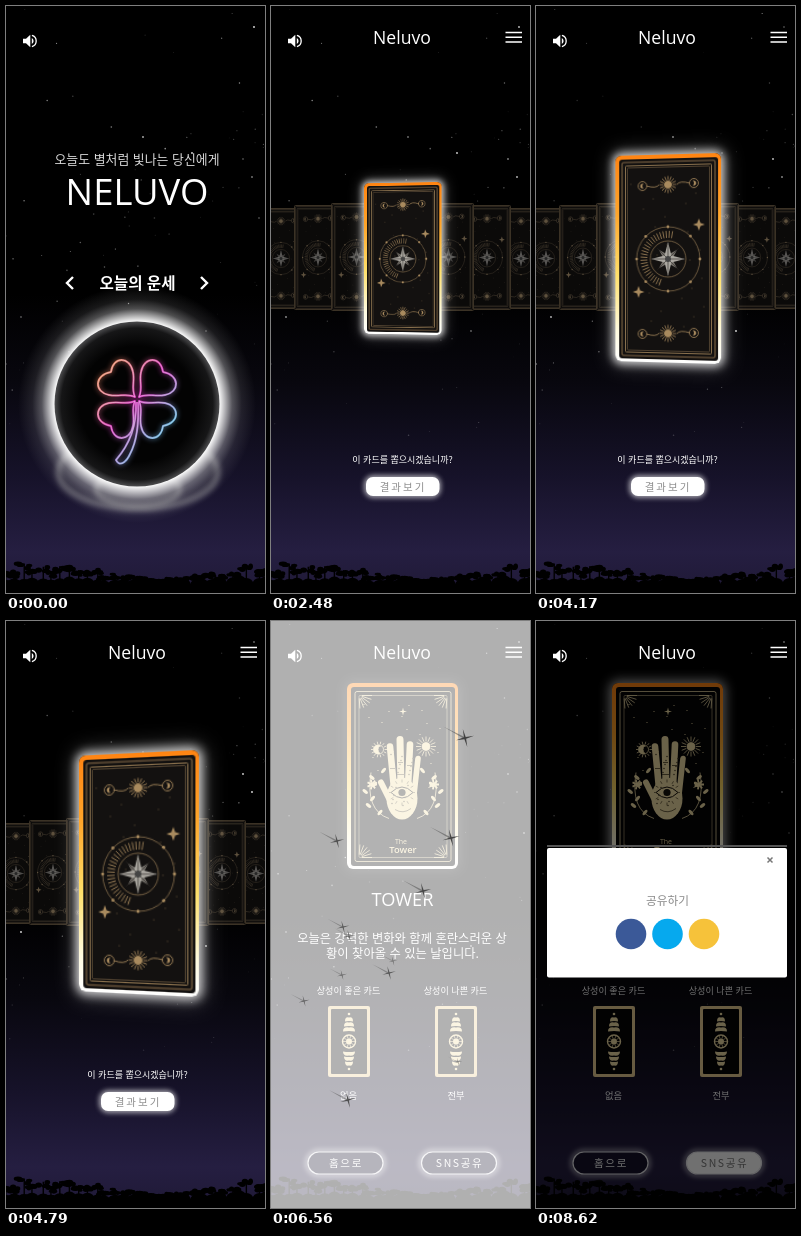
Animation of 259x587 px, one loop 8670 ms. Source, as an HTML page:

```html
<!DOCTYPE html>
<html lang="ko">
<head>
<meta charset="utf-8">
<title>Neluvo</title>
<style>
html, body { margin: 0; width: 100%; height: 100%; overflow: hidden; background: #000; }
#stage { position: relative; width: 259px; height: 587px; overflow: hidden; background: #000; }
#stage > svg { position: absolute; left: 0; top: 0; width: 259px; height: 587px; }
text { font-family: "Noto Sans CJK KR", "Noto Sans CJK", "Noto Sans", sans-serif; text-anchor: middle; fill: #fff; }
.latin { font-family: "Open Sans", "Noto Sans", sans-serif; }
.frame {
  position: absolute; box-sizing: border-box; padding: 3.5px; border-radius: 6px;
  background: linear-gradient(#ff8412, #ffa52a 28%, #ffe06a 58%, #fffbe0 85%, #fff);
}
.frame svg { display: block; width: 100%; height: 100%; }
#card {
  left: 78px; top: 149px; width: 107px; height: 207px;
  box-shadow: 0 0 9px 3px rgba(255,255,255,.75), 0 0 18px 5px rgba(255,255,255,.25);
}
#prize { left: 76px; top: 62px; width: 111px; height: 186px; }
#near { clip-path: inset(0 0 0 169px); }
#white { position: absolute; inset: 0; background: #fff; }
#dim { position: absolute; inset: 0; background: #000; }
</style>
</head>
<body>
<div id="stage"></div>
<script>
const LOOP = 8670;
const GOLD = '#a88a5e', CREAM = '#f3dfa6';

let seed = 11;
const rnd = () => (seed = (seed * 16807) % 2147483647) / 2147483647;
const clamp = v => Math.max(0, Math.min(1, v));
const ramp = (t, a, b) => clamp((t - a) / (b - a));
const times = (n, fn) => Array.from({ length: n }, (_, i) => fn(i)).join('');

// Value at time t in a table of [time, value] steps
function track(t, keys) {
  for (let i = 1; i < keys.length; i++) {
    const [a, u] = keys[i - 1], [b, v] = keys[i];
    if (t < b) return u + (v - u) * ramp(t, a, b);
  }
  return keys[keys.length - 1][1];
}

const svg = (id, body) => `<svg id="${id}" viewBox="0 0 259 587">${body}</svg>`;
const label = (x, y, size, str, more = '') => `<text x="${x}" y="${y}" font-size="${size}" ${more}>${str}</text>`;
const circle = (x, y, r, more = '') => `<circle cx="${x}" cy="${y}" r="${r}" ${more}/>`;
const ellipse = (x, y, rx, ry, more = '') => `<ellipse cx="${x}" cy="${y}" rx="${rx}" ry="${ry}" ${more}/>`;
const rect = (x, y, w, h, r, more = '') => `<rect x="${x}" y="${y}" width="${w}" height="${h}" rx="${r}" ${more}/>`;
const path = (d, more = '') => `<path d="${d}" ${more}/>`;
const at = (x, y, body, more = '') => `<g transform="translate(${x} ${y}) ${more}">${body}</g>`;

const rays = (n, r1, r2, from = 0, span = 2 * Math.PI) => times(n, i => {
  const a = from + span * i / n, c = Math.cos(a), s = Math.sin(a);
  return `M${(c * r1).toFixed(2)} ${(s * r1).toFixed(2)}L${(c * r2).toFixed(2)} ${(s * r2).toFixed(2)}`;
});
const spark = (r, w) => `M0 ${-r}L${w} ${-w}L${r} 0L${w} ${w}L0 ${r}L${-w} ${w}L${-r} 0L${-w} ${-w}Z`;

// ---- sky ----
const stars = [[248, 21], [237, 153], [246, 171], [186, 147], [137, 131], [15, 311], [200, 325], [253, 212]]
  .map(([x, y]) => ({ x, y, r: .9, a: .9, p: rnd() * 6 }));
for (let i = 0; i < 80; i++) {
  const x = rnd() * 259, y = i < 36 ? 285 - x * .9 + rnd() * 110 : rnd() * 450;
  stars.push({ x, y, r: .35 + rnd() * .5, a: .2 + rnd() * .5, p: rnd() * 6 });
}

// Crowns stand high at both sides and low in the middle
const trees = times(30, i => {
  const x = i * 9 + rnd() * 5 - 3, side = Math.min(1, Math.abs(x - 150) / 75);
  const top = 574 - side * (4 + 13 * rnd()), w = 5 + rnd() * 4;
  return path(`M${x} 587V${top}`, 'stroke="#000" stroke-width="1.4"') +
    times(6, () => ellipse(x + (rnd() - .5) * w * 1.5, top + rnd() * 5, 2 + rnd() * 2.4, 1.4 + rnd() * 1.4)) +
    ellipse(x, 580 - side * 2, 7, 4 + rnd() * 4);
});

const sky = svg('sky', `
  <defs>
    <linearGradient id="night" x2="0" y2="1">
      <stop offset=".49" stop-color="#000"/><stop offset=".64" stop-color="#08070e"/>
      <stop offset=".8" stop-color="#161229"/><stop offset=".93" stop-color="#251e41"/>
      <stop offset="1" stop-color="#1f1936"/>
    </linearGradient>
    <radialGradient id="halo">
      <stop offset=".69" stop-color="#fff"/><stop offset=".735" stop-color="#fff" stop-opacity=".72"/>
      <stop offset=".8" stop-color="#fff" stop-opacity=".3"/><stop offset=".88" stop-color="#fff" stop-opacity=".09"/>
      <stop offset="1" stop-color="#fff" stop-opacity="0"/>
    </radialGradient>
    <radialGradient id="orb">
      <stop offset=".7" stop-color="#030303"/><stop offset=".92" stop-color="#161617"/><stop offset="1" stop-color="#4c4c4e"/>
    </radialGradient>
    <linearGradient id="neon" gradientUnits="userSpaceOnUse" x1="-40" y1="-34" x2="38" y2="34">
      <stop offset="0" stop-color="#e08a4a"/><stop offset=".3" stop-color="#d9688a"/>
      <stop offset=".5" stop-color="#d02fb4"/><stop offset=".68" stop-color="#a86fc4"/><stop offset="1" stop-color="#48c4dc"/>
    </linearGradient>
    <filter id="soft" x="-50%" y="-80%" width="200%" height="260%"><feGaussianBlur stdDeviation="2.6"/></filter>
    <symbol id="back" viewBox="-50 -100 100 200" preserveAspectRatio="none">${cardBack()}</symbol>
  </defs>
  <rect width="259" height="587" fill="url(#night)"/>
  <g id="stars" fill="#fff">${stars.map(s => circle(s.x, s.y, s.r)).join('')}</g>
  ${trees}<rect y="578" width="259" height="9"/>`);

// ---- tarot back ----
function cardBack() {
  const sun = y => at(0, y,
    path('M-22 1Q-12 4 -9 0M22 -1Q12 -4 9 0') + path(rays(16, 4.5, 8.5)) + circle(0, 0, 3.6, `fill="${GOLD}"`) +
    circle(-26, 1, 4.5) + circle(26, -1, 4.5) +
    path('M-25 -1.5a2.6 2.6 0 1 0 0 5a3.4 3.4 0 0 1 0 -5M25 -3.5a2.6 2.6 0 1 1 0 5a3.4 3.4 0 0 0 0 -5', `fill="${GOLD}" stroke="none"`));
  const dots = times(26, i => circle(((i * 37) % 76) - 38, ((i * 61) % 150) - 75, .45));
  return rect(-50, -100, 100, 200, 3, 'fill="#131110"') +
    `<g fill="none" stroke="${GOLD}" stroke-width=".8">` +
    rect(-47, -97, 94, 194, 2, 'stroke="#5e4b34" stroke-width="1.6"') + rect(-43.5, -93.5, 87, 187, 1) +
    rect(-41.5, -91.5, 83, 183, 1, 'stroke-width=".4"') + sun(-74) + sun(74) +
    circle(0, 0, 32, 'stroke-width=".6"') + circle(0, 0, 18, 'stroke-width=".6"') +
    path(rays(26, 21, 28, 1.9, 3.1)) + '</g>' +
    `<g fill="${GOLD}">${dots}` + times(8, i => circle(32 * Math.cos(i * .785), 32 * Math.sin(i * .785), 1.4)) +
    at(31, -34, path(spark(6, 1.6))) + at(-30, 33, path(spark(6, 1.6))) + '</g>' +
    path(spark(13, 3), 'fill="#77736d" transform="rotate(45)"') + path(spark(17, 3.4), 'fill="#aaa7a0"') +
    path(rays(8, 0, 15), 'stroke="#2a2724" stroke-width=".6"') + circle(0, 0, 3, 'fill="#444"');
}

// ---- home ----
const petal = 'M-2 -2C-6 -10 -2 -18 -4 -27C-7 -43 -24 -43 -26 -27C-43 -24 -43 -7 -28 -4C-18 -2 -10 -6 -2 -2Z';
const mirror = (d, sx, sy) => d.replace(/(-?\d+) (-?\d+)/g, (_, x, y) => `${x * sx} ${y * sy}`);
const clover = mirror(petal, 1, 1) + mirror(petal, -1, 1) + mirror(petal, 1, -1) + mirror(petal, -1, -1) +
  'M-1 3C0 28 -8 46 -21 61C-17 69 -10 62 -7 55C0 42 2 24 1 3';
const ripple = (y, rx, ry, w) => ellipse(132, y, rx, ry, `fill="#555" fill-opacity=".22" stroke="#aaa" stroke-opacity=".4" stroke-width="${w}" filter="url(#soft)"`);
const home = svg('home',
  ripple(466, 80, 37, 6) + ripple(483, 42, 18, 5) +
  circle(131, 398, 119, 'fill="url(#halo)"') + circle(131, 398, 82.5, 'fill="url(#orb)"') +
  at(131, 393, `<g fill="none" stroke="url(#neon)" stroke-linejoin="round">` +
    path(clover, 'stroke-width="3.4" opacity=".5" filter="url(#soft)"') + path(clover, 'stroke-width="2"') +
    path(clover, 'stroke="#fff" stroke-width=".6" opacity=".7"') + '</g>') +
  label(131, 158, 12.9, '오늘도 별처럼 빛나는 당신에게', 'font-weight="300" opacity=".85"') +
  label(131, 199, 36.5, 'NELUVO', 'class="latin"') +
  label(131.5, 283, 15.6, '오늘의 운세', 'font-weight="700"') +
  path('M67 271l-6 6l6 6M195 271l6 6l-6 6', 'fill="none" stroke="#fff" stroke-width="2.4"'));

// ---- deck ----
const slot = (x, y, w, h) => `<use href="#back" x="${x}" y="${y}" width="${w}" height="${h}"/>` +
  rect(x + .5, y + .5, w - 1, h - 1, 1, 'fill="none" stroke="#6b5638" stroke-width="1"');
const shade = body => `<g style="filter:brightness(.58) saturate(.75)">${body}</g>`;
const deck = svg('deck', shade(
  slot(-14, 202, 48, 101) + slot(23, 199, 48, 105) + slot(60, 197, 51, 108) +
  slot(226, 202, 48, 101) + slot(192, 199, 48, 105) + slot(152, 197, 51, 108)));
const near = svg('near', shade(slot(152, 197, 51, 110)));
const ask = svg('ask', label(131.5, 457, 9, '이 카드를 뽑으시겠습니까?') +
  '<g id="see">' + rect(93, 469, 77, 23, 9, 'fill="#fff" opacity=".6" filter="url(#soft)"') +
  rect(95, 471, 73.5, 19, 7, 'fill="#fff"') +
  label(132, 484.5, 10.5, '결과보기', 'style="fill:#8d8d8d" letter-spacing="2" font-weight="300"') + '</g>');

// ---- result ----
function handCard() {
  const finger = (x1, y1, x2, y2, w) => path(`M${x1} ${y1}L${x2} ${y2}`, `stroke="${CREAM}" stroke-width="${w}" stroke-linecap="round"`);
  const corner = (sx, sy) => at(sx * 44, sy * 81, path(rays(6, 3, 13, 0, 1.8)), `scale(${-sx} ${-sy})`);
  const sprig = s => path(`M${s * 14} 42Q${s * 38} 34 ${s * 32} -4`) +
    times(7, i => at(s * (26 + 8 * Math.sin(i * .6) + (i % 2 ? 4 : -3)), 36 - i * 7, ellipse(0, 0, 3.2, 1.6, `fill="${CREAM}" stroke="none" transform="rotate(${s * (i % 2 ? -40 : 50)})"`))) +
    at(s * 31, 8, circle(0, 0, 2, `fill="${CREAM}"`) + path(rays(7, 2, 5), 'stroke-width="1.8"'));
  const dots = times(24, i => circle(((i * 29) % 78) - 39, ((i * 47) % 88) - 72, .6, `fill="${CREAM}" stroke="none"`));
  const ink = times(22, i => circle(((i * 17) % 23) - 12, ((i * 31) % 60) - 22, .7, 'fill="#3a321f"'));
  return `<svg viewBox="-52 -89.5 104 179"><rect x="-52" y="-89.5" width="104" height="179" rx="3" fill="#050505"/>` +
    `<g fill="none" stroke="${CREAM}" stroke-width=".8">` + rect(-48, -85, 96, 170, 2) + rect(-44, -81, 88, 162, 1, 'stroke-width=".5"') +
    corner(1, 1) + corner(-1, 1) + corner(1, -1) + corner(-1, -1) + sprig(1) + sprig(-1) + dots +
    at(23, -30, circle(0, 0, 4, `fill="${CREAM}"`) + path(rays(16, 5, 10))) +
    at(-24, -27, circle(0, 0, 4.5) + path('M1 -4a4.5 4.5 0 1 0 0 8a5 5 0 0 1 0 -8', `fill="${CREAM}"`) + path(rays(14, 5.5, 8))) +
    at(0, -65, path(spark(4, .8), `fill="${CREAM}" stroke="none"`)) + '</g>' +
    finger(-13, -30, -9, 12, 6.6) + finger(-3, -37, -2, 10, 7) + finger(7, -32, 5, 10, 6.6) + finger(15, -18, 11, 18, 5.6) +
    finger(-22, 6, -11, 28, 6) + ellipse(-1, 22, 15.5, 21, `fill="${CREAM}"`) + ink +
    path('M-12 16Q-1 5 10 16Q-1 27 -12 16Z', `fill="${CREAM}" stroke="#15120c" stroke-width="1"`) +
    circle(-1, 16, 3.6, 'fill="#15120c"') + path(rays(12, 10, 13), 'transform="translate(-1 16)" stroke="#4a3f28" stroke-width=".7"') +
    path('M-8 33Q0 38 8 32M-6 -2h8M-13 -8h5M-5 -14h5M4 -11h5', 'fill="none" stroke="#4a3f28" stroke-width=".8"') +
    label(-2, 67, 7, 'The', `class="latin" style="fill:${CREAM}"`) +
    label(0, 76, 9.4, 'Tower', `class="latin" style="fill:${CREAM}" font-weight="600"`) + '</svg>';
}
const leaf = (y, w) => path(`M0 ${y}Q${-w} ${y + 1} ${-w} ${y - 4}Q0 ${y - 3} ${w} ${y - 4}Q${w} ${y + 1} 0 ${y}Z`);
const smallCard = x => rect(x, 385, 42, 71, 2, 'fill="#ecd094"') + rect(x + 3, 388, 36, 65, 1, 'fill="#050505"') +
  at(x + 21, 420.5, `<g fill="${CREAM}">` +
    circle(0, 0, 6.5, `fill="none" stroke="${CREAM}" stroke-width="1.4"`) + circle(0, 0, 3) +
    path(rays(10, 3, 6), `stroke="${CREAM}" stroke-width=".7"`) +
    [1, -1].map(s => at(0, 0, times(3, i => leaf(14 + i * 5, 6 - i)) + circle(0, 27.5, 1.3), `scale(1 ${s})`)).join('') + '</g>');
const pill = (x, str, id) => rect(x - 1, 530, 77, 24, 12, 'fill="none" stroke="#fff" stroke-width="3" opacity=".65" filter="url(#soft)"') +
  rect(x, 531, 75, 22, 11, `id="${id}" fill="#15112a" stroke="#e4e4e8" stroke-width="1.2"`) +
  label(x + 38, 546, 10.5, str, `id="${id}Text" letter-spacing="1.6" font-weight="300"`);
const result = svg('result',
  label(131.5, 285, 18.2, 'TOWER', 'class="latin"') +
  label(131, 322, 12.3, '오늘은 강력한 변화와 함께 혼란스러운 상', 'font-weight="300"') +
  label(131.5, 337, 12.3, '황이 찾아올 수 있는 날입니다.', 'font-weight="300"') +
  label(77.5, 373, 9.1, '상성이 좋은 카드') + label(184.5, 373, 9.1, '상성이 나쁜 카드') +
  smallCard(57) + smallCard(164) + label(77.5, 478, 9.3, '없음') + label(185, 478, 9.3, '전부') +
  pill(37, '홈으로', 'toHome') + pill(150.5, 'SNS공유', 'share'));

// ---- overlays ----
// Meteors are listed from large to small
const flock = [
  { from: 5310, mid: 5560, to: 6020, list: [[98, 328], [47, 293], [45, 339], [10, 187], [92, 338], [143, 231], [162, 426], [165, 104], [7, 365], [250, 176], [137, 192], [32, 454], [123, 252]] },
  { from: 6120, mid: 6560, to: 7040, list: [[194, 117], [180, 217], [152, 270], [77, 479], [66, 220], [118, 352], [72, 306], [78, 315], [33, 380], [71, 354], [122, 340], [187, 441]] }
];
const meteor = i => `<g transform="scale(${1.15 - i * .055})" opacity="${.95 - i * .04}">` +
  path(spark(8, .8), 'transform="rotate(-14)"') + path('M-19 -10L0 -.7L-1 .7Z', 'opacity=".5"') + '</g>';
const meteors = svg('meteors', flock.map((f, n) => `<g id="flock${n}" fill="#3c3c3c">` +
  f.list.map(([x, y], i) => at(x, y, meteor(i))).join('') + '</g>').join(''));

const modal = svg('modal', rect(11, 224, 240, 2, 0, 'fill="#555"') + rect(11, 227, 240, 129.5, 2, 'fill="#fff"') +
  path('M231.5 236.5l5 5m0 -5l-5 5', 'stroke="#777" stroke-width="1.5"') +
  label(131.5, 284, 11.7, '공유하기', 'style="fill:#8a8a8a" font-weight="300"') +
  circle(95, 313, 15.3, 'fill="#3b5998"') + circle(131.5, 313, 15.3, 'fill="#06a9ee"') + circle(168, 313, 15.3, 'fill="#f6c23a"'));

const header = svg('header',
  at(24, 35, path('M-7 -2.3h3l4.3 -4v12.6l-4.3 -4h-3z', 'fill="#fff"') +
    path('M1.8 -3a3.4 3.4 0 0 1 0 6z', 'fill="#fff"') + path('M1.9 -5.6a5.8 5.8 0 0 1 0 11.2', 'fill="none" stroke="#fff" stroke-width="1.3"')) +
  '<g id="bar">' + label(131, 37.5, 17.6, 'Neluvo', 'class="latin" font-weight="500"') +
  path('M234.5 26.5h16.5M234.5 31.2h16.5M234.5 36h16.5', 'stroke="#fff" stroke-width="1.6"') + '</g>');

document.getElementById('stage').innerHTML = sky + home + deck +
  `<div id="card" class="frame"><svg viewBox="0 0 100 200"><use href="#back" width="100" height="200"/></svg></div>` +
  near + ask + result + `<div id="prize" class="frame">${handCard()}</div>` +
  '<div id="white"></div>' + meteors + '<div id="dim"></div>' + modal + header;

// ---- motion ----
const SCALE = [[800, .5], [1200, .55], [1560, .62], [2500, .735], [3400, .86], [4150, 1], [4790, 1.165], [5200, 1.3], [5560, 1.46], [6050, 1.75]];
const TURN = [[900, 0], [1560, -16], [2500, -9], [3400, -4], [4790, -16], [5150, 0], [5560, 45], [6050, 88]];
const WHITE = [[5290, 0], [5560, .41], [5960, 1], [6300, 1], [6560, .69], [7060, 0]];
const SWAP = 6080;

const $ = id => document.getElementById(id);
const show = (id, a) => { $(id).style.opacity = a; $(id).style.visibility = a > 0 ? 'visible' : 'hidden'; };
const dots = [...$('stars').children];

function draw(t) {
  const enter = ramp(t, 250, 800), picking = t < SWAP ? enter : 0, done = t < SWAP ? 0 : 1;
  dots.forEach((d, i) => d.setAttribute('opacity', stars[i].a * (.65 + .35 * Math.cos(stars[i].p + t * Math.PI * 6 / LOOP))));

  show('home', 1 - ramp(t, 150, 700));
  show('bar', enter);
  show('deck', picking);
  show('card', picking);
  show('near', t > 5250 && t < SWAP ? 1 : 0);
  show('ask', t < SWAP ? ramp(t, 800, 1300) : 0);
  show('see', t < SWAP ? ramp(t, 900, 1620) : 0);
  $('card').style.transform = `perspective(700px) rotateY(${track(t, TURN)}deg) scale(${track(t, SCALE)})`;

  show('result', done);
  show('prize', done);
  $('prize').style.boxShadow = `0 0 11px 3px rgba(255,255,255,${.1 + .55 * ramp(t, 6500, 7500)})`;
  show('white', track(t, WHITE));
  flock.forEach((f, n) => {
    show('flock' + n, Math.min(ramp(t, f.from, f.from + 150), 1 - ramp(t, f.to - 200, f.to)));
    const s = (t - f.mid) / 1000;
    $('flock' + n).setAttribute('transform', `translate(${s * 44} ${s * 22})`);
  });

  const pressed = t >= 7900;
  $('share').setAttribute('fill', pressed ? '#fff' : '#15112a');
  $('shareText').style.fill = pressed ? '#777' : '#fff';
  show('dim', .56 * ramp(t, 7960, 8300));
  show('modal', ramp(t, 7980, 8320));
}

const start = performance.now();
function tick() {
  draw((performance.now() - start) % LOOP);
  requestAnimationFrame(tick);
}
tick();
</script>
</body>
</html>
```
